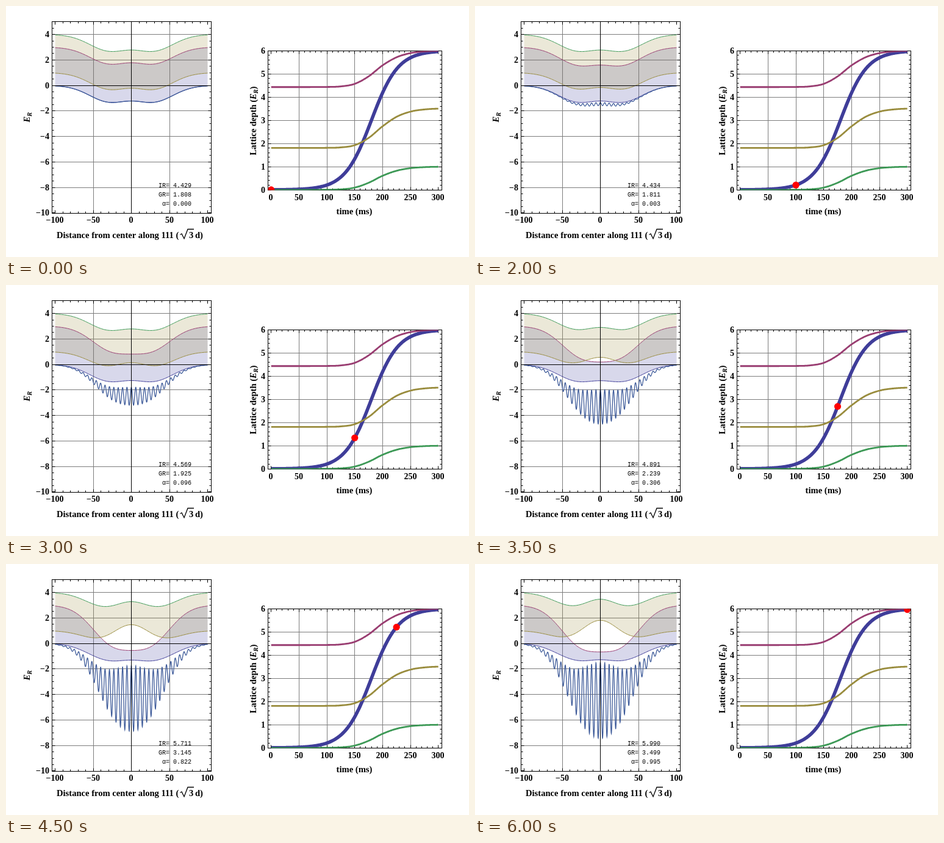
Animation, 759 px wide and 411 px high, one loop 6.5 s. Source, as an HTML page with a canvas:

```html
<!DOCTYPE html>
<html>
<head>
<meta charset="utf-8">
<style>
html, body { margin: 0; width: 100%; height: 100%; overflow: hidden; background: #fff; }
canvas { display: block; }
</style>
</head>
<body>
<canvas width="759" height="411"></canvas>
<script>
const ctx = document.querySelector('canvas').getContext('2d');
const BLUE = '#3f3d99', PURPLE = '#993d71', OLIVE = '#998c3d', GREEN = '#3d9956', STEEL = '#3d5a99';
const SERIF = '"Liberation Serif", "Times New Roman", serif';
const MONO = '"Liberation Mono", "Courier New", monospace';
const STEP = 500, DT = 25, COUNT = 13;

// Ramp values every 25 ms
const IR = [4.429, 4.429, 4.429, 4.430, 4.434, 4.458, 4.569, 4.891, 5.365, 5.711, 5.893, 5.965, 5.990];
const GR = [1.808, 1.808, 1.808, 1.808, 1.811, 1.830, 1.925, 2.239, 2.738, 3.145, 3.370, 3.464, 3.499];
const ALPHA = [0, 0, .00003, .0004, .003, .021, .096, .306, .606, .822, .935, .979, .995];
const depth = t => 6 / (1 + Math.exp((180 - t) / 24));

const left = {
  box: [75.5, 25.5, 336.5, 339.5],
  x: v => 205.5 + 1.25 * v, y: v => 130.1 - 20.88 * v,
  xTicks: [-100, 100, 10, 50], yTicks: [-10, 4.5, .5, 2],
  gridX: [-50, 50], gridY: [-8, -6, -4, -2, 2, 4], labelX: 71, labelY: 355
};
const right = {
  box: [429.5, 73.5, 714.5, 301.5],
  x: v => 434.7 + .9132 * v, y: v => 301.05 - 38 * v,
  xTicks: [0, 300, 10, 50], yTicks: [0, 6, .2, 1],
  gridX: [50, 100, 150, 200, 250], gridY: [1, 2, 3, 4, 5], labelX: 425, labelY: 318
};

const snap = v => Math.floor(v) + .5;

function line(x1, y1, x2, y2, color = '#000') {
  ctx.strokeStyle = color;
  ctx.lineWidth = 1;
  ctx.beginPath();
  ctx.moveTo(x1, y1);
  ctx.lineTo(x2, y2);
  ctx.stroke();
}

function text(s, x, y, font, align = 'left') {
  ctx.font = font;
  ctx.textAlign = align;
  ctx.fillStyle = '#000';
  ctx.fillText(s, x, y);
}

function grid(p) {
  const [x1, y1, x2, y2] = p.box;
  for (const v of p.gridX) line(snap(p.x(v)), y1, snap(p.x(v)), y2, '#7d7d7d');
  for (const v of p.gridY) line(x1, snap(p.y(v)), x2, snap(p.y(v)), '#7d7d7d');
}

function eachTick([from, to, step, major], draw) {
  for (let i = 0; i <= Math.round((to - from) / step); i++) {
    const v = +(from + i * step).toFixed(2);
    const isMajor = Number.isInteger(v / major);
    draw(v, isMajor ? 5 : 3, isMajor && String(v).replace('-', '\u2212'));
  }
}

function frame(p) {
  const [x1, y1, x2, y2] = p.box, font = 'bold 14px ' + SERIF;
  ctx.strokeStyle = '#000';
  ctx.lineWidth = 1;
  ctx.strokeRect(x1, y1, x2 - x1, y2 - y1);
  eachTick(p.xTicks, (v, len, label) => {
    const x = snap(p.x(v));
    line(x, y1, x, y1 + len);
    line(x, y2, x, y2 - len);
    if (label) text(label, x - .5, p.labelY, font, 'center');
  });
  eachTick(p.yTicks, (v, len, label) => {
    const y = snap(p.y(v));
    line(x1, y, x1 + len, y);
    line(x2, y, x2 - len, y);
    if (label) text(label, p.labelX, y + 4.5, font, 'right');
  });
}

function trace(p, f, from, to, step) {
  const n = Math.round((to - from) / step);
  for (let i = 0; i <= n; i++) {
    const v = from + i * step;
    ctx.lineTo(p.x(v), p.y(f(v)));
  }
}

function curve(p, f, range, color, width) {
  ctx.beginPath();
  trace(p, f, ...range);
  ctx.strokeStyle = color;
  ctx.lineWidth = width;
  ctx.stroke();
}

function fillBetween(p, f, g, color) {
  ctx.beginPath();
  trace(p, f, -100, 100, 1);
  trace(p, g, 100, -100, -1);
  ctx.globalAlpha = .2;
  ctx.fillStyle = color;
  ctx.fill();
  ctx.globalAlpha = 1;
}

function clipTo(p, draw) {
  const [x1, y1, x2, y2] = p.box;
  ctx.save();
  ctx.beginPath();
  ctx.rect(x1, y1, x2 - x1, y2 - y1);
  ctx.clip();
  draw();
  ctx.restore();
}

// Mathieu characteristic value as a continued fraction
function mathieu(start, c, n, q) {
  let e = start;
  for (let i = 0; i < 8; i++) e = start - c * q * q / (n * n - e - q * q / ((n + 2) ** 2 - e));
  return e;
}

function drawBands(k) {
  const root = Math.sqrt(ALPHA[k]);
  const beam = x => IR[k] * Math.exp(-x * x / 1951);
  const local = x => beam(x) * root;
  const floor = x => -1.5 * beam(x) * (1 + root) + 3 * GR[k] * Math.exp(-x * x / 1413);
  const level = (start, sign, c, n) => x => {
    const q = local(x) / 4;
    return 2 * q + mathieu(start + sign * q, c, n, q);
  };
  const ground = level(0, 0, 2, 2), groundTop = level(1, -1, 1, 3);
  const excited = level(1, 1, 1, 3), excitedTop = level(4, 0, 1, 4);
  const low = x => floor(x) + 3 * ground(x);
  const top = x => floor(x) + 3 * groundTop(x);
  const low2 = x => floor(x) + 2 * ground(x) + excited(x);
  const top2 = x => floor(x) + 2 * ground(x) + excitedTop(x);
  const lattice = x => floor(x) + local(x) * Math.cos(Math.PI * x / 5.75) ** 2;

  fillBetween(left, low, top, BLUE);
  fillBetween(left, low2, top2, OLIVE);
  for (const [f, color] of [[low, BLUE], [top, PURPLE], [low2, OLIVE], [top2, GREEN]])
    curve(left, f, [-100, 100, 1], color, 1);
  curve(left, lattice, [-100, 100, .2], STEEL, 1.3);
}

// Catmull-Rom interpolation of a ramp table
const ramp = a => t => {
  const i = Math.min(COUNT - 2, Math.floor(t / DT)), u = t / DT - i;
  const at = j => a[Math.max(0, Math.min(COUNT - 1, j))];
  const [p, q, r, s] = [at(i - 1), at(i), at(i + 1), at(i + 2)];
  return q + u / 2 * (r - p + u * (2 * p - 5 * q + 4 * r - s + u * (3 * (q - r) + s - p)));
};

function drawRamps(k) {
  const range = [0, 300, 1];
  curve(right, depth, range, BLUE, 5.6);
  curve(right, ramp(IR), range, PURPLE, 2.8);
  curve(right, ramp(GR), range, OLIVE, 2.8);
  curve(right, ramp(ALPHA), range, GREEN, 2.8);
  ctx.fillStyle = '#f00';
  ctx.beginPath();
  ctx.arc(right.x(k * DT), right.y(depth(k * DT)), 5.6, 0, 7);
  ctx.fill();
}

function energySymbol(x, y) {
  text('E', x, y, 'italic bold 14.5px ' + SERIF);
  text('R', x + 9.5, y + 3, 'italic bold 10.5px ' + SERIF);
}

function rotated(x, y, draw) {
  ctx.save();
  ctx.translate(x, y);
  ctx.rotate(-Math.PI / 2);
  draw();
  ctx.restore();
}

function drawLabels(k) {
  const font = 'bold 14.6px ' + SERIF, mono = '10px ' + MONO;
  text('Distance from center along 111 (', 83, 380, font);
  text('3', 300, 380, font);
  text('d)', 310, 380, font);
  ctx.lineWidth = 1.3;
  ctx.strokeStyle = '#000';
  ctx.beginPath();
  for (const [x, y] of [[285.5, 374.5], [288, 373], [292, 381], [298, 365.5], [308, 365.5]]) ctx.lineTo(x, y);
  ctx.stroke();
  text('time (ms)', 571, 341, font, 'center');
  rotated(39, 190.5, () => energySymbol(0, 0));
  rotated(409.5, 244.5, () => {
    text('Lattice depth (', 0, 0, font);
    const w = ctx.measureText('Lattice depth (').width;
    energySymbol(w, 0);
    text(')', w + 16.5, 0, font);
  });
  [['IR', IR], ['GR', GR], ['α', ALPHA]].forEach(([name, values], i) =>
    text(name + '= ' + values[k].toFixed(3), 304, 296.5 + 15 * i, mono, 'right'));
}

function render(now) {
  const k = Math.floor(now / STEP) % COUNT;
  ctx.fillStyle = '#fff';
  ctx.fillRect(0, 0, 759, 411);
  grid(left);
  grid(right);
  clipTo(left, () => drawBands(k));
  line(205.5, 25, 205.5, 339);
  line(75, 130.5, 336, 130.5);
  frame(left);
  frame(right);
  clipTo(right, () => drawRamps(k));
  drawLabels(k);
}

const start = performance.now();
function tick() {
  render(performance.now() - start);
  requestAnimationFrame(tick);
}
tick();
</script>
</body>
</html>
```
